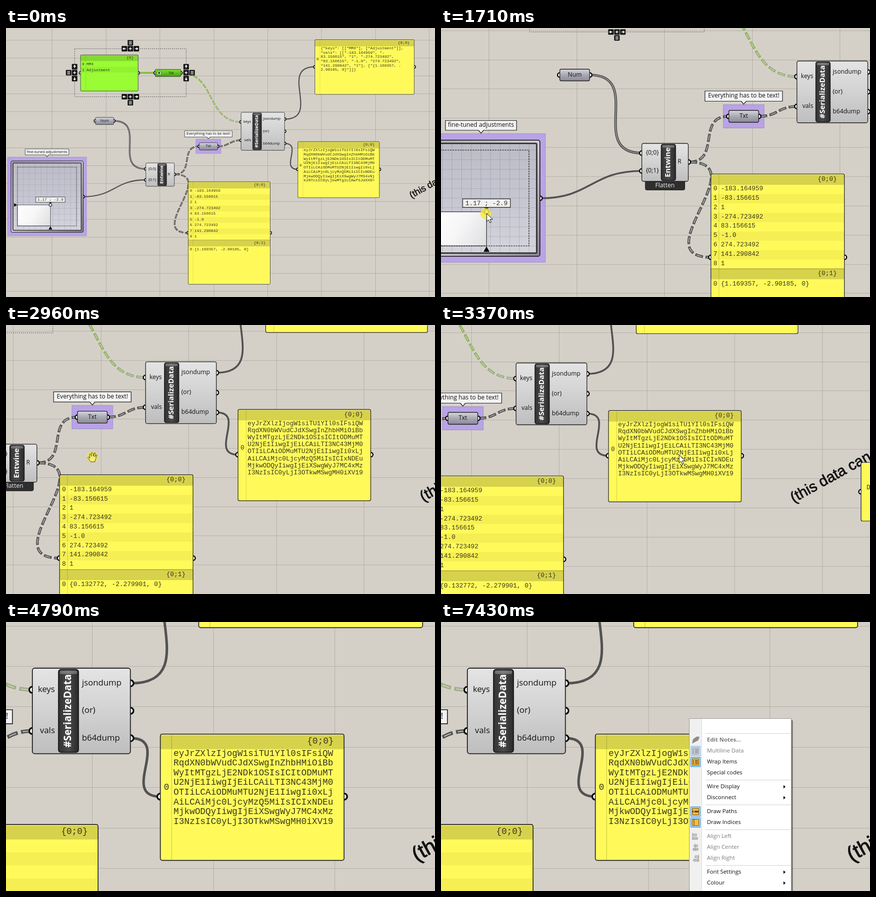
Animation, 863 px wide and 542 px high, one loop 8000 ms. Source, as an HTML page with a canvas:

```html
<!DOCTYPE html>
<html lang="en">
<head>
<meta charset="utf-8">
<style>
html, body { margin: 0; height: 100%; overflow: hidden; background: #d4d0c8; }
canvas { display: block; }
</style>
</head>
<body>
<canvas id="stage" width="863" height="542"></canvas>
<script>
const W = 863, H = 542, LOOP = 8000;
const c = document.getElementById('stage').getContext('2d');
const SANS = '"Open Sans", sans-serif', MONO = '"Liberation Mono", monospace';
const UI = '12.2px ' + SANS, CODE = '12.9px ' + MONO;
const DARK = '#222', WIRE = '#525252', YELLOW = '#fffa5a';

const clamp = u => Math.max(0, Math.min(1, u));
const smooth = u => u * u * (3 - 2 * u);
const mix = (a, b, u) => a + (b - a) * u;

// ---- timeline ----
// wheel notches: time, direction, pointer position
const NOTCHES = [
  [350, 1, 85.9, 334.7], [430, 1, 85.9, 334.7], [510, 1, 85.9, 334.7],
  [3510, 1, 489.9, 263.7], [3590, 1, 489.9, 263.7], [3670, 1, 489.9, 263.7], [3750, 1, 489.9, 263.7],
  [4400, -1, 606.1, 582.3], [4560, -1, 606.1, 582.3]
];
const POINTER = [
  [0, -40, 420], [70, -40, 420], [330, 86, 335], [1000, 86, 335], [1250, 88, 396], [1600, 92, 374],
  [1720, 92, 374], [2050, 82, 368], [2180, 82, 368], [2560, 609, 258], [2630, 609, 258],
  [3110, 44, 268], [3370, 479, 262], [3480, 490, 264], [3790, 490, 264], [3980, 422, 250],
  [4060, 422, 250], [4330, 606, 582], [6290, 499, 580], [6650, 499, 330], [6800, 500, 332],
  [7140, 545, 462], [7400, 600, 580], [8000, 600, 580]
];
const MENU_TIME = 6760, PAN_STEP = 90;
// the view follows the drag in discrete redraws
const panAt = t => 1 - (1 - clamp((Math.floor(t / PAN_STEP) * PAN_STEP - 2630) / 480)) ** 2;
const panning = t => t > 2600 && t < 3110;
const pressed = t => (t > 1640 && t < 2120) || panning(t) || (t > 6650 && t < MENU_TIME);

function viewAt(t) {
  let s = 0.85 ** 3, x = 127.1, y = 127.3, panned = false;
  const pan = () => { x -= 565 * panAt(t); y += 10 * panAt(t); panned = true; };
  for (const [when, dir, px, py] of NOTCHES) {
    if (when > t) break;
    if (when > 3000 && !panned) pan();
    const k = 0.85 ** -dir;
    s *= k; x = px + (x - px) * k; y = py + (y - py) * k;
  }
  if (!panned) pan();
  return { s, x, y };
}

function pointerAt(t) {
  const i = POINTER.findIndex(k => k[0] > t), a = POINTER[i - 1], b = POINTER[i];
  const u = t > 2630 && panning(t) ? panAt(t) : smooth((t - a[0]) / (b[0] - a[0]));
  return [mix(a[1], b[1], u), mix(a[2], b[2], u)];
}

function sliderAt(t) {
  const u = smooth(clamp((t - 1720) / 330));
  return [+mix(1.169357, 0.132772, u).toFixed(6), +mix(-2.90185, -2.279901, u).toFixed(6)];
}

// ---- drawing helpers ----
function text(s, x, y, font = UI, color = '#111', align = 'left') {
  c.font = font; c.fillStyle = color; c.textAlign = align;
  c.fillText(s, x, y);
}
const code = (s, x, y, align) => text(s, x, y + 0.8, CODE, '#38371c', align);

function box(x, y, w, h, r, fill, stroke, lw = 1.3) {
  c.beginPath(); c.roundRect(x, y, w, h, r);
  if (fill) { c.fillStyle = fill; c.fill(); }
  if (stroke) { c.strokeStyle = stroke; c.lineWidth = lw; c.stroke(); }
}
function shade(x0, y0, x1, y1, ...colors) {
  const g = c.createLinearGradient(x0, y0, x1, y1);
  colors.forEach((col, i) => g.addColorStop(i / (colors.length - 1), col));
  return g;
}
function line(x0, y0, x1, y1, color, lw = 1) {
  c.strokeStyle = color; c.lineWidth = lw;
  c.beginPath(); c.moveTo(x0, y0); c.lineTo(x1, y1); c.stroke();
}
function poly(color, ...p) {
  c.fillStyle = color; c.beginPath();
  for (let i = 0; i < p.length; i += 2) c.lineTo(p[i], p[i + 1]);
  c.closePath(); c.fill();
}
function grip(x, y) {
  c.beginPath(); c.arc(x, y, 4.5, 0, 7);
  c.fillStyle = '#fff'; c.fill();
  c.strokeStyle = '#080808'; c.lineWidth = 2.4; c.stroke();
}

function wire(x0, y0, x1, y1, kind, color = WIRE, core = '#bdbab2') {
  const d = Math.max(Math.abs(x1 - x0) / 2, Math.abs(y1 - y0) * 0.7);
  const stroke = (col, lw, dash, offset = 0) => {
    c.strokeStyle = col; c.lineWidth = lw;
    c.setLineDash(dash); c.lineDashOffset = offset;
    c.stroke();
  };
  c.beginPath(); c.moveTo(x0, y0);
  c.bezierCurveTo(x0 + d, y0, x1 - d, y1, x1, y1);
  if (kind === 'item') stroke(color, 3.7, []);
  if (kind === 'list') { stroke(color, 5.2, []); stroke(core, 1.2, []); }
  if (kind === 'tree') { stroke(color, 5.4, [16, 5]); stroke(core, 1.5, [11, 10], -2.5); }
  c.setLineDash([]);
}

function balloon(s, x, y, w, h) {
  box(x, y, w, h, 0, '#f2f2f2', DARK, 1.2);
  const m = x + w / 2;
  poly(DARK, m - 6, y + h, m + 6, y + h, m, y + h + 7);
  poly('#f2f2f2', m - 5, y + h - 1, m + 5, y + h - 1, m, y + h + 5);
  text(s, m, y + h / 2, UI, '#111', 'center');
}

function pill(s, x, y, w, h, tx = x + w / 2, colors = ['#d6d6de', '#a9a9b3', '#8b8b96']) {
  grip(x, y + h / 2); grip(x + w, y + h / 2);
  box(x, y, w, h, 3, shade(0, y, 0, y + h, ...colors), DARK);
  text(s, tx, y + h / 2, UI, '#111', 'center');
}

function component(name, x, y, w, h, barX, inputs, outputs) {
  for (const [, , gy] of inputs) grip(x, gy);
  for (const [, , gy] of outputs) grip(x + w, gy);
  box(x, y, w, h, 3.5, shade(0, y, 0, y + h, '#e4e4e4', '#d2d2d2', '#bebebe'), DARK);
  for (const [s, tx, ty] of [...inputs, ...outputs]) text(s, tx, ty);
  box(barX, y + 2, 29, h - 4, 3.5, shade(barX, 0, barX + 29, 0, '#333', '#4a4a4a', '#2a2a2a'), '#111');
  box(barX + 2, y + 3.5, 25, 5, 2, 'rgba(255,255,255,.28)');
  c.save(); c.translate(barX + 14.5, y + h / 2); c.rotate(-Math.PI / 2);
  text(name, 0, 0, 'bold 14.8px ' + SANS, '#fff', 'center');
  c.restore();
}

function panel(x, y, w, h, gripY, fill = YELLOW) {
  grip(x, gripY); grip(x + w, gripY);
  box(x, y, w, h, 3, fill);
}
function panelHeader(label, x, y, w, h = 22, fill = '#d7d24c') {
  box(x, y, w, h, 0, fill);
  code(label, x + w - 15, y + h / 2 - 1.5, 'right');
}
function panelEdge(x, y, w, h, column) {
  line(x + column, y, x + column, y + h, 'rgba(90,85,0,.3)', 0.8);
  line(x + 2, y + 1.2, x + w - 2, y + 1.2, 'rgba(255,255,255,.55)', 0.9);
  box(x, y, w, h, 3, null, DARK, 1.2);
}
function textPanel(x, y, w, h, gripY, lines) {
  panel(x, y, w, h, gripY);
  panelHeader('{0;0}', x, y, w);
  lines.forEach((s, i) => code(s, x + 19.2, y + 27.6 + i * 14.15));
  code('0', x + 9, y + 27.6 + (lines.length - 1) * 7.07, 'center');
  panelEdge(x, y, w, h, 16.4);
}

// ---- the document ----
const NUMBERS = ['-183.164959', '-83.156615', '1', '-274.723492', '83.156615', '-1.0', '274.723492', '141.290842', '1'];

function grid({ s, x, y }) {
  const color = 'rgba(60,58,50,.2)';
  for (let gx = (120 * s + x) % (176.5 * s); gx < W; gx += 176.5 * s) line(Math.round(gx) + .5, 0, Math.round(gx) + .5, H, color);
  for (let gy = (7.8 * s + y) % (58.85 * s); gy < H; gy += 58.85 * s) line(0, Math.round(gy) + .5, W, Math.round(gy) + .5, color);
}

function slider([vx, vy]) {
  const L = -169.5, T = 249, S = 193.5, B = T + S - 0.5;
  const x = L + (vx + 10) / 20 * S, y = B - (vy + 10) / 20 * S;
  grip(46, 346);
  box(-190.6, 229, 236.6, 234, 4, shade(-190, 229, 46, 463, '#a9a9ad', '#cfcfd2', '#85858a'), '#111', 1.6);
  box(-184, 235.5, 223.5, 221, 2, shade(0, 237, 0, 455, '#bcbcc6', '#c6c6d2', '#d4d4dc'), '#3c3c40', 3);
  for (let i = 0; i <= 10; i++) {
    const p = i * S / 10;
    line(L + p, 237, L + p, 455, 'rgba(90,90,115,.25)', 0.9);
    line(-182, T + p, 38, T + p, 'rgba(90,90,115,.25)', 0.9);
  }
  box(L, y, x - L, B - y, 0, shade(L, y, x, B, '#fff', '#f6f6f6', '#dedee2'), '#333', 1.2);
  c.setLineDash([3, 2]);
  box(L, T, S, B - T, 0, null, '#111', 1.2);
  c.setLineDash([]);
  poly('#000', L - 11, y - 6, L - 11, y + 6, L - 1, y);
  poly('#000', x - 6, B + 12, x + 6, B + 12, x, B + 1);
  box(x - 48, y - 26, 96, 17, 0, '#f0f0f0', DARK, 1.2);
  poly(DARK, x - 5, y - 9, x + 5, y - 9, x, y - 3);
  code(`${+vx.toFixed(2)} ; ${+vy.toFixed(2)}`, x, y - 18, 'center');
  c.beginPath(); c.arc(x, y, 4.6, 0, 7);
  c.fillStyle = '#eee'; c.fill(); c.strokeStyle = '#222'; c.lineWidth = 1.8; c.stroke();
}

function scene(s, value) {
  const point = `{${value[0]}, ${value[1]}, 0}`;
  const json = `{"keys": [["MMX"], ["Adjustment"]], "vals": [[${NUMBERS.map(n => `"${n}"`).join(', ')}], ["${point}"]]}`;

  const purple = '#b9a3e6', edge = '#9f8bcb';
  box(-202, 216, 259, 259, 0, purple, edge, 1);
  box(415, 157.5, 82, 47, 0, purple, edge, 1);

  wire(146, 97.5, 251, 255, 'list');
  wire(47, 346, 251, 291, 'item');
  wire(346, 273, 425, 181, 'tree');
  wire(346, 273, 390, 465, 'tree');
  wire(487, 181, 563, 161, 'tree');
  wire(366, -60, 563, 101, 'tree', shade(366, 0, 563, 0, '#74b41e', '#8db254', '#a2aa94'), '#cdd3b4');
  wire(226, -60, 282, -60, 'list', '#74b02c', '#a8dc60');
  wire(706, 91.5, 805, -80, 'item');
  wire(706, 171.5, 749, 256.5, 'item');

  // selected items
  panel(37.3, -119, 188.7, 118.5, -60, '#99fc34');
  panelHeader('{0}', 37.3, -119, 188.7, 20, '#83d92f');
  box(37.3, -80, 188.7, 19, 0, '#92f230');
  ['MMX', 'Adjustment'].forEach((w, i) => {
    code(i, 46, -89 + i * 19.5, 'center'); code(w, 57, -89 + i * 19.5);
  });
  panelEdge(37.3, -119, 188.7, 118.5, 16.4);
  pill('Txt', 281.5, -71.5, 84.5, 23.5, 334, ['#84dc3c', '#62c11c', '#4a9c12']);
  box(287.5, -66.5, 14, 14, 4, '#b9e69a', '#1f4a08', 1);
  poly('#17380a', 294.5, -64.5, 299, -59.5, 296, -59.5, 296, -55, 293, -55, 293, -59.5, 290, -59.5);

  pill('Num', 86, 86, 60, 23.5);
  pill('Txt', 426, 169, 60, 24);
  balloon('Everything has to be text!', 378, 130, 156, 20.5);
  balloon('fine-tuned adjustments', -144, 189.5, 143, 19.5);
  slider(value);

  c.globalAlpha = clamp((s - 0.65) * 4);
  box(258, 308, 79.5, 21.5, 3, '#2e2e2e', '#222', 1);
  text('Flatten', 297.5, 320.5, UI, '#f2f2f2', 'center');
  c.globalAlpha = 1;
  component('Entwine', 251, 235.5, 93.5, 76.5, 290,
    [['{0;0}', 259, 255], ['{0;1}', 259, 291]], [['R', 323, 273]]);
  component('#SerializeData', 563, 69.5, 142.5, 124.5, 601,
    [['keys', 571, 101], ['vals', 574, 161]],
    [['jsondump', 635, 91.5], ['(or)', 635, 131.5], ['b64dump', 635, 171.5]]);

  // number panel
  const x = 390, w = 268.5;
  panel(x, 297, w, 336.5, 465);
  panelHeader('{0;0}', x, 297, w, 22);
  NUMBERS.forEach((n, i) => {
    if (i % 2) box(x, 319 + i * 18.8, w, 18.8, 0, '#f5ef53');
    code(i, 399, 326 + i * 18.8, 'center');
    code(n, 410, 326 + i * 18.8);
  });
  panelHeader('{0;1}', x, 488.2, w, 21);
  line(x, 488.2, x + w, 488.2, '#8a862c');
  code('0', 399, 517.5, 'center');
  code(point, 410, 517.5);
  panelEdge(x, 297, w, 336.5, 16);

  textPanel(804.7, -169, 325.5, 179.5, -80, json.match(/.{1,36}([ -]|$)/g));
  textPanel(749, 165.4, 267, 184, 256.5, btoa(json).match(/.{1,30}/g));

  c.save(); c.translate(1121.5, 351.5); c.rotate(-29 * Math.PI / 180);
  c.textBaseline = 'alphabetic';
  text('(this data can', 0, 0, '30px "Liberation Sans", sans-serif', '#111');
  c.strokeStyle = '#111'; c.lineWidth = 0.8;
  c.strokeText('(this data can', 0, 0);
  c.textBaseline = 'middle';
  c.restore();
  panel(1257, 270, 200, 118, 329);
  code('Data', 1268, 320);
  panelEdge(1257, 270, 200, 118, 0);
}

// alignment widget: constant size on screen
function button(x, y, dx, dy, bars) {
  box(x - 5.5, y - 5.5, 11, 11, 1, '#111');
  if (bars) {
    for (let i = -2.5; i <= 2.5; i += 2.5) line(x - 3, y + i, x + 3, y + i, '#fff', 1.2);
    return;
  }
  if (!dx) line(x, y - 3, x, y + 3, '#fff', 1.4);
  if (!dy) line(x - 3, y, x + 3, y, '#fff', 1.4);
  if (dx || dy) poly('#fff', x + 4 * dx, y + 4 * dy, x + 3 * dy, y + 3 * dx, x - 3 * dy, y - 3 * dx);
}
function selection({ s, x, y }) {
  const l = 37.3 * s + x - 12, r = 366 * s + x + 10.5, t = -119 * s + y - 12.5, b = -0.5 * s + y + 11.5;
  const mx = (l + r) / 2, my = (t + b) / 2;
  c.setLineDash([2, 2]);
  box(l, t, r - l, b - t, 0, null, '#555', 1);
  c.setLineDash([]);
  for (const [ey, out] of [[t, -12], [b, 12]]) {
    for (const d of [-1, 0, 1]) button(mx + d * 12, ey, d, 0);
    button(mx, ey + out, 0, 0, true);
  }
  for (const [ex, out] of [[l, -12], [r, 12]]) {
    for (const d of [-1, 0, 1]) button(ex, my + d * 12, 0, d);
    button(ex + out, my, 0, 0, true);
  }
}

// ---- context menu: label, y, style, icon ----
const ITEMS = [
  ['Edit Notes...', 238, 'bold', 'tag'], ['Multiline Data', 260, 'off', 'dim'], ['Wrap Items', 282, '', 'list'],
  ['Special codes', 304], ['Wire Display', 332, 'sub'], ['Disconnect', 354, 'sub'],
  ['Draw Paths', 382, '', 'path'], ['Draw Indices', 404, '', 'index'],
  ['Align Left', 432, 'off', -1], ['Align Center', 454, 'off', 0], ['Align Right', 476, 'off', 1],
  ['Font Settings', 504, 'sub'], ['Colour', 526, 'sub']
];
function icon(kind, y) {
  const x = 512;
  if (kind === 'tag') return poly('#8d8d8d', x - 7, y + 7, x - 5, y - 2, x + 2, y - 7, x + 8, y - 7, x + 6, y, x - 1, y + 4);
  if (typeof kind === 'number') {
    const edge = x + kind * 6;
    box(x - 3 + kind * 2, y - 5, 7, 4, 0, '#d0d0d0', '#999', 1);
    box(x - 5 + kind, y + 2, 10, 4, 0, '#c4c4c4', '#999', 1);
    return line(edge, y - 7, edge, y + 7, '#999', 1);
  }
  const dim = kind === 'dim';
  box(x - 9.5, y - 9.5, 19, 19, 0, dim ? '#d2e3f3' : '#b9dcfa', dim ? '#7fb2e0' : '#1a80d8', 1);
  box(x - 6.5, y - 6.5, 13, 13, 0, dim ? '#c9ced4' : '#f8bd3c', dim ? '#8c949c' : '#6b4c10', 1);
  const ink = dim ? '#7e868e' : '#4a3510';
  if (kind === 'path') { line(x - 6, y, x + 6, y, ink, 3); return line(x - 3, y - 1, x - 3, y + 1, '#ffe9a8', 2); }
  if (kind === 'index') { c.setLineDash([1.5, 1.5]); line(x - 3, y - 6, x - 3, y + 6, ink, 2); return c.setLineDash([]); }
  for (let i = -3; i <= 3; i += 3) { line(x - 5, y + i, x - 3, y + i, ink, 1.4); line(x - 1, y + i, x + 5, y + i, ink, 1.4); }
}
function menu([px, py]) {
  box(503, 198, 205, 400, 0, 'rgba(0,0,0,.4)');
  box(499.5, 194.5, 205, 400, 0, '#fff', '#9a9a9a', 1);
  box(500, 195, 24, 400, 0, '#f0f0f0');
  line(524.5, 195, 524.5, H, '#dcdcdc');
  for (const y of [224.5, 318.5, 368.5, 418.5, 490.5]) line(532, y, 703, y, '#d2d2d2');
  for (const [label, y, style, kind] of ITEMS) {
    if (px > 501 && Math.abs(py - y) <= 11) box(501.5, y - 10.5, 201, 21, 0, '#c9e0f6', '#5aa2e0', 1);
    if (kind !== undefined) icon(kind, y);
    const grey = style === 'off' || style === 'bold';
    text(label, 535, y, (style === 'bold' ? 'bold ' : '') + '11.4px ' + SANS, grey ? '#7c7c7c' : '#111');
    if (style === 'sub') poly('#000', 689, y - 3.5, 689, y + 3.5, 693, y);
  }
}

function pointer(t, [x, y]) {
  const hand = panning(t);
  if (pressed(t)) {
    c.beginPath(); c.arc(x - (hand ? 0 : 2), y, 11, 0, 7);
    c.fillStyle = 'rgba(243,234,60,.8)'; c.fill();
  }
  c.save(); c.translate(x, y);
  c.lineJoin = c.lineCap = 'round';
  const path = new Path2D(hand
    ? 'M-4 9L-9 2Q-9 -1-6 1L-5 3L-6 -5Q-5 -8-3 -5L-2 -1L-2 -8Q0 -11 1 -8L2 -1L4 -8Q6 -9 6 -6L5 0L8 -4Q10 -5 9 -2L6 6L5 10H-3Z'
    : 'M0 0V16L3.8 12.5L6.4 18.4L9 17.2L6.5 11.5H11.5Z');
  c.fillStyle = hand ? '#f6ef72' : '#fff'; c.fill(path);
  c.strokeStyle = hand ? '#4a4720' : '#111'; c.lineWidth = 1; c.stroke(path);
  c.restore();
}

function draw(t) {
  const view = viewAt(t), at = pointerAt(t);
  c.fillStyle = '#d4d0c8'; c.fillRect(0, 0, W, H);
  c.textBaseline = 'middle';
  grid(view);
  c.save();
  c.translate(view.x, view.y); c.scale(view.s, view.s);
  scene(view.s, sliderAt(t));
  c.restore();
  selection(view);
  if (t >= MENU_TIME) menu(at);
  pointer(t, at);
}

function tick() {
  draw(performance.now() % LOOP);
  requestAnimationFrame(tick);
}
tick();
</script>
</body>
</html>
```
